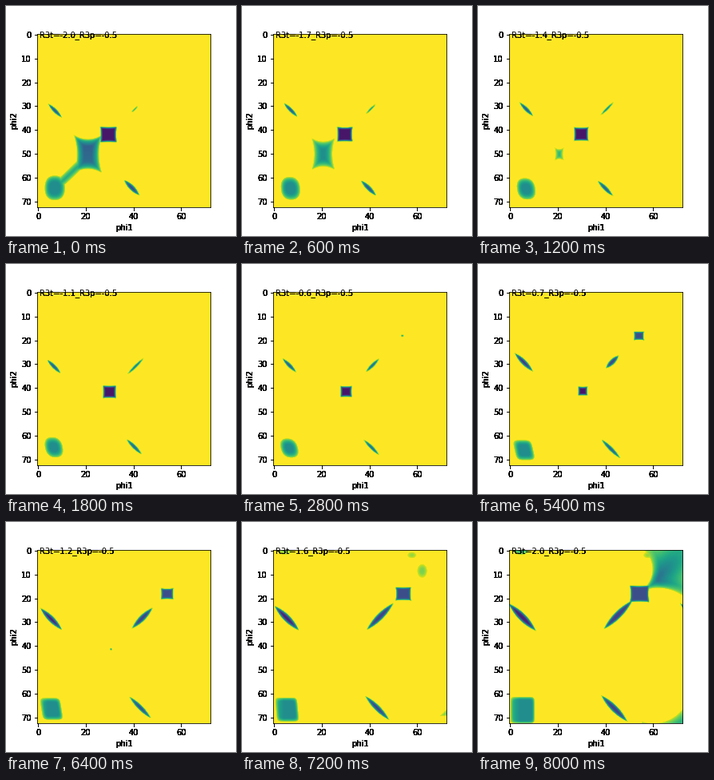
These frames come from a looping animation (288x288 px, 8.2 s). A matplotlib script:

```python
import numpy as np
import matplotlib.pyplot as plt
from matplotlib.animation import FuncAnimation
from matplotlib.transforms import Bbox

plt.rcParams["font.family"] = "DejaVu Sans"
N = 73
FRAMES = 41
FINE = 3
axis = (np.arange(N * FINE) + .5) / FINE - .5
X, Y = np.meshgrid(axis, axis)


def ramp(t, a, b):
    return float(np.clip((t - a) / (b - a), 0, 1))


# Each shape returns its depth below the outline, negative outside.

def lens(cx, cy, half, w, sign):
    """Pointed sliver along a diagonal; sign 1 falls, -1 rises."""
    dx, dy = X - cx, sign * (Y - cy)
    u = (dx + dy) / np.sqrt(2) / half
    return w * (1 - u * u) - np.abs(dx - dy) / np.sqrt(2)


def cushion(cx, cy, a, b, pinch):
    """Box whose sides bend inwards."""
    dx, dy = np.abs(X - cx), np.abs(Y - cy)
    bend = lambda q: 1 - pinch * (1 - np.minimum(q, 1) ** 2)
    return np.minimum(a * bend(dy / b) - dx, b * bend(dx / a) - dy)


def rounded(cx, cy, a, b, p=2, skew=0):
    """Superellipse, slanted by skew."""
    u = np.abs(X - cx - skew * (Y - cy)) / a
    v = np.abs(Y - cy) / b
    return (1 - (u ** p + v ** p) ** (1 / p)) * min(a, b)


def capsule(x0, y0, x1, y1, w):
    dx, dy = x1 - x0, y1 - y0
    k = np.clip(((X - x0) * dx + (Y - y0) * dy) / (dx * dx + dy * dy), 0, 1)
    return w - np.hypot(X - x0 - k * dx, Y - y0 - k * dy)


def outside(cx, cy, r):
    return np.hypot(X - cx, Y - cy) - r


def field(t):
    z = np.ones_like(X)
    up, down = max(t, 0), max(-t, 0)

    def dig(depth, level, soft):
        k = np.sqrt(np.clip(depth / soft, 0, 1))
        np.minimum(z, 1 - (1 - level) * k, out=z)

    # slivers; the left one wraps around to the right edge
    half = 4.1 + 2 * up
    for shift in (0, 72):
        dig(lens(6 - .5 * t + shift, 30 - t, half, .2 * half, 1), .1, 1.1)
    half = np.interp(t, [-2, -1.1, 0, .7, 1.6, 2], [2.1, 4.9, 2.9, 3.8, 8, 8.6])
    dig(lens(41.8 + 1.2 * t + .25 * t * t, 30 - 1.1 * t - .2 * t * t,
             half, .9 + .3 * t, -1), .2, .9)
    dig(lens(41.4 + 1.1 * t, 65.3 + .5 * t, 4.6 + 1.6 * up,
             .75 + .08 * t + .13 * t * t, 1), .2, 1)

    # centre square shrinks away, upper one grows
    size = (2 + .75 * down) * (1 - ramp(t, .8, 1.3))
    if size > 0:
        dig(cushion(30.4 - .5 * down, 41.4 + .3 * down, size, .95 * size, .08),
            .06, .8)
    size = (1.9 + .55 * up * up) * ramp(t, -.7, -.3)
    if size > 0:
        dig(cushion(53.8 + .2 * t, 18.2, size, .87 * size, .08), .24, .8)

    # lower left patch turns from a drop into a square
    dig(rounded(6 - .45 * t, 65.7 + .65 * t, 3.7 + .2 * t + .25 * t * t,
                4 + .1 * t + .35 * t * t, 2.4 + 3 * up, .25 * (1 - t * t / 4)),
        .49 + .05 * np.maximum(0, 4 - X), 2.2 - .5 * up)

    # central blob and its neck
    fade = ramp(t, -2, -1.7)
    size = 1 - ramp(t, -1.7, -1.2)
    if size > 0:
        level = .3 + .2 * fade + .008 * (Y - 46) * (1 - fade)
        dig(cushion(20.8 - .3 * fade, 50.2, (5.9 - fade) * size,
                    (8 - 1.3 * fade) * size, .22), level, 3)
    dig(capsule(7.5, 64, 18, 54, 1.9 * (1 - ramp(t, -2, -1.75))), .6, 2)

    # pale spots, then the corner bay between two round yellow areas
    fade = ramp(t, 1.2, 1.6)
    dig(rounded(57.7, 2, 1.9, 1.3), 1 - .16 * fade, 1)
    dig(rounded(62, 8.6, 2.1, 2.9), 1 - .2 * fade, 1.4)
    dig(rounded(4.5, -.3, 3.5, 2.2), 1 - .2 * fade - .2 * ramp(t, 1.6, 2), 2)
    dx, dy = X - 61, Y - 12
    r = np.hypot(dx, dy)
    level = .35 + .025 * r + .008 * r * np.cos(4 * np.arctan2(dy, dx))
    bay = np.minimum(outside(49, 8, 10.6), outside(62, 33.5, 17.7))
    bay = np.minimum(bay, X - 54)
    dig(bay, 1 - (1 - np.clip(level, 0, 1)) * ramp(t, 1.6, 2), 3)

    # lower right edge
    late = ramp(t, 1.6, 2)
    wedge = outside(60, 57, 15.5 + 5 * (1 - ramp(t, .8, 1.6)))
    for limit in (X - 55, Y - 62, 69.5 + 8 * late - Y):
        wedge = np.minimum(wedge, limit)
    dig(wedge, .65, 3)
    return z


fig = plt.figure(figsize=(4, 4), dpi=72, facecolor="white")


def add_frame():
    ax = fig.add_axes((.135, .125, .755, .755), label=str(len(fig.axes)))
    ax.patch.set_visible(False)
    ax.set(xlim=(-.5, N - .5), ylim=(N - .5, -.5), xlabel="phi1", ylabel="phi2",
           xticks=range(0, 61, 20), yticks=range(0, 71, 10))
    return ax


ax = add_frame()
image = ax.imshow(field(-2), cmap="viridis", vmin=0, vmax=1, aspect="auto",
                  interpolation="bilinear", extent=(-.5, N - .5, N - .5, -.5))
# stacked copies give the heavy lettering outside the plot
for _ in range(10):
    add_frame().spines[:].set_visible(False)
above = Bbox([[0, 254], [288, 288]])
labels = [ax.text(.5, 1, "")]
labels += [ax.text(.5, 1, "", clip_box=above, clip_on=True) for _ in range(4)]


def update(i):
    t = (i - 20) / 10
    image.set_data(field(t))
    for label in labels:
        label.set_text(f"R3t={t:.1f}_R3p=-0.5")
    return [image, *labels]


anim = FuncAnimation(fig, update, frames=FRAMES, interval=200, repeat=True)
plt.show()
```
